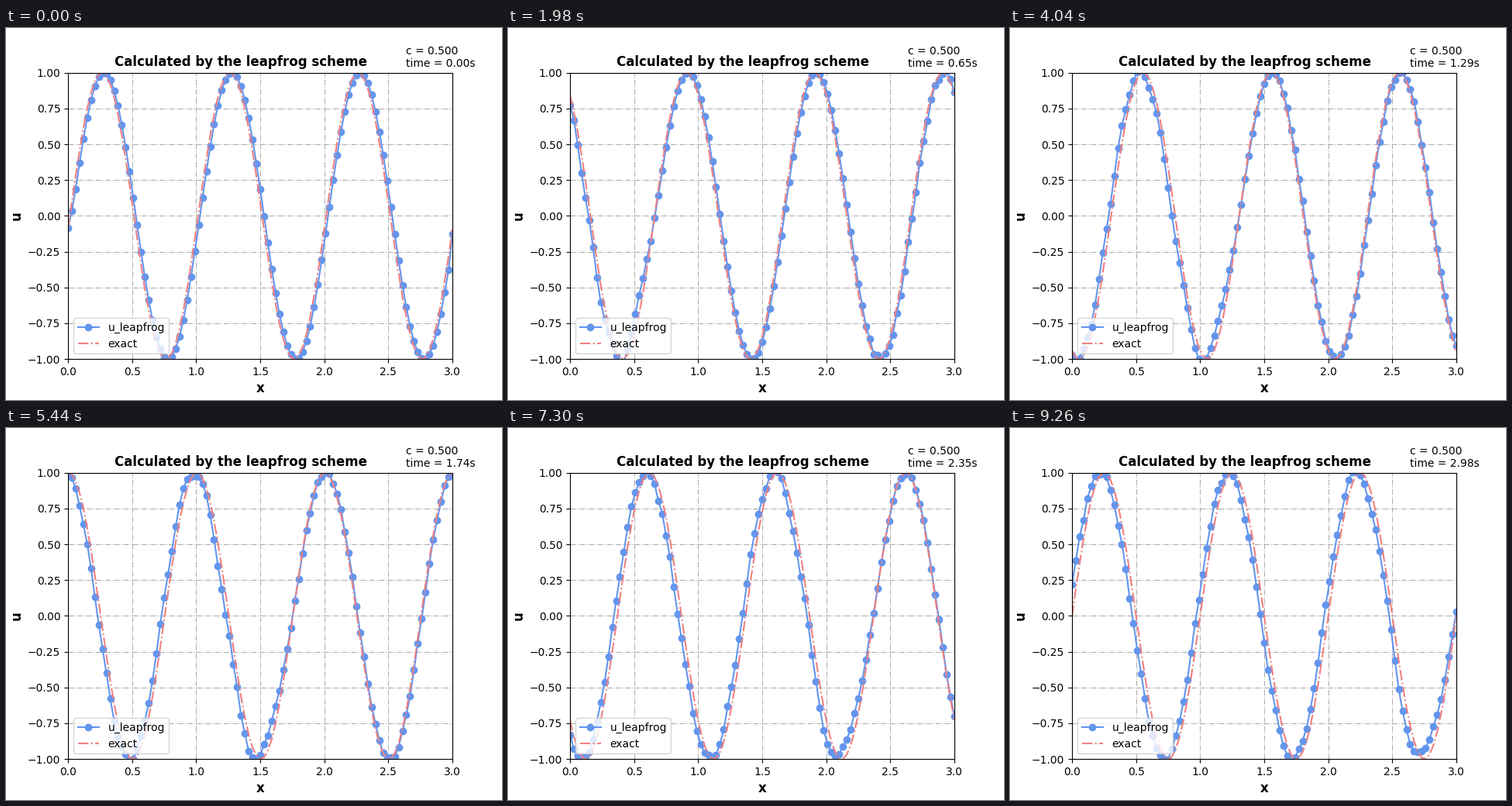
Recreate the animation shown at these times as a matplotlib script. Size 640x480 px, loop 9280 ms.

```python
import numpy as np
import matplotlib.pyplot as plt
from matplotlib.animation import FuncAnimation

plt.rcParams["font.family"] = "DejaVu Sans"

C = 0.5            # Courant number
DX = 0.03
DT = C * DX
STEPS = 200
TICK = 20          # ms
TICKS = 464

x = np.linspace(0, 3, 101)


def wave(t):
    return np.sin(2 * np.pi * (x - t))


def solve():
    """Leapfrog on a periodic grid, started with one Lax-Wendroff step."""
    old = wave(0)
    right, left = np.roll(old, -1), np.roll(old, 1)
    now = old - C / 2 * (right - left) + C**2 / 2 * (right - 2 * old + left)
    rows = []
    for _ in range(STEPS):
        old, now = now, old - C * (np.roll(now, -1) - np.roll(now, 1))
        rows.append(now)
    return rows


def step_at(tick):
    """Three steps per 140 ms, held for 20, 100 and 20 ms."""
    block, rest = divmod(tick, 7)
    return 3 * block + (rest >= 1) + (rest >= 6)


states = solve()

fig, ax = plt.subplots(figsize=(6.4, 4.8), dpi=100)
ax.set_xlim(0, 3)
ax.set_ylim(-1, 1)
ax.grid(linestyle="-.")
ax.set_title("Calculated by the leapfrog scheme", x=0.45, fontweight="bold")
ax.set_xlabel("x", fontsize=12, fontweight="bold")
ax.set_ylabel("u", fontsize=12, fontweight="bold")

numeric, = ax.plot(x, states[0], "o-", color="cornflowerblue", label="u_leapfrog")
exact, = ax.plot(x, wave(DT), "-.", color="lightcoral", label="exact")
info = ax.text(0.88, 1.02, "", transform=ax.transAxes)
ax.legend(loc="lower left")


def update(tick):
    n = step_at(tick)
    numeric.set_ydata(states[n])
    exact.set_ydata(wave((n + 1) * DT))
    info.set_text(f"c = {C:.3f}\ntime = {n * DT:.2f}s")
    return numeric, exact, info


anim = FuncAnimation(fig, update, frames=TICKS, interval=TICK,
                     repeat=True, repeat_delay=0)
plt.show()
```
